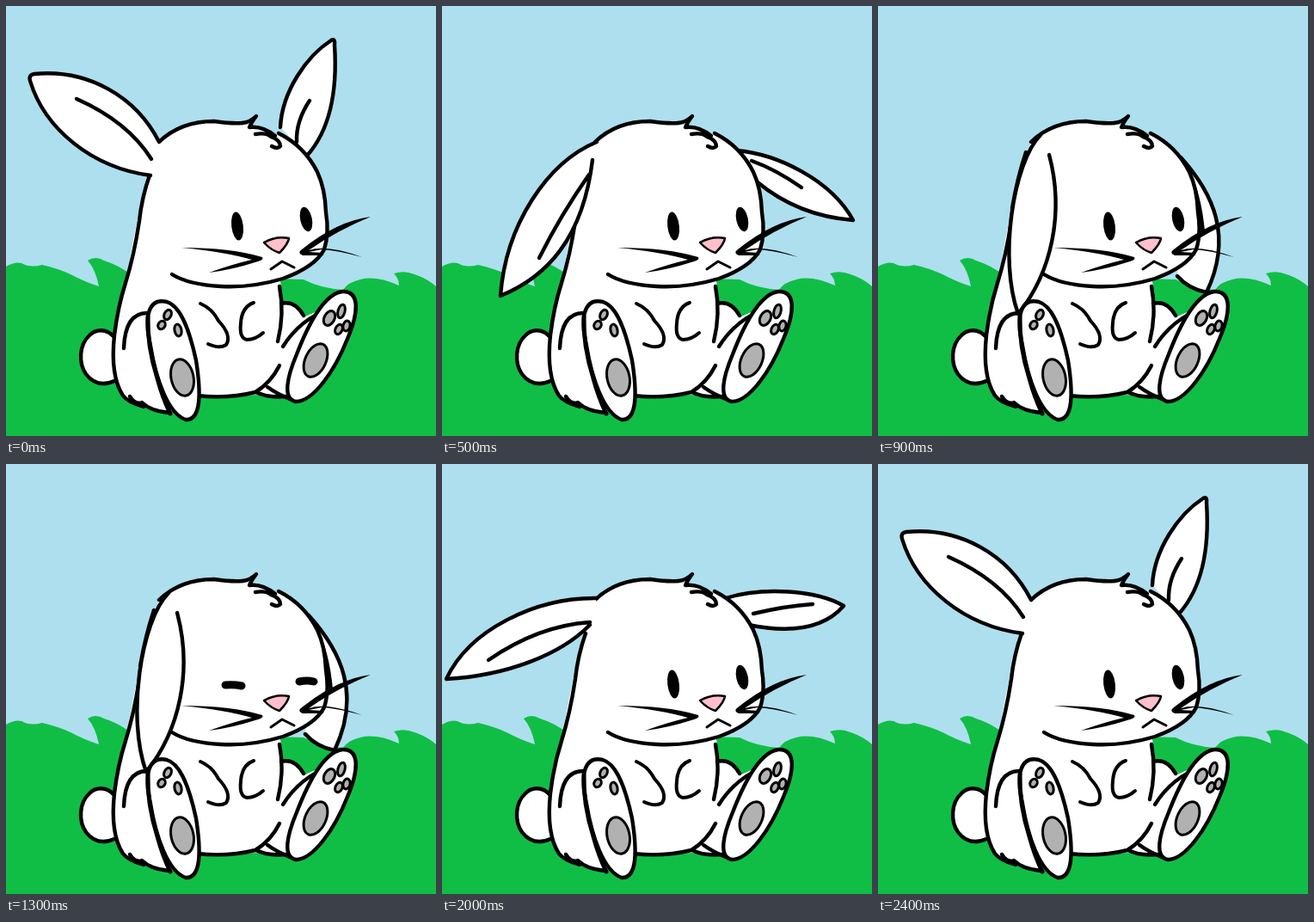
These frames come from a looping animation (500x500 px, 2.5 s). An HTML page:

```html
<!DOCTYPE html>
<html>
<head>
<meta charset="utf-8">
<title>Bunny</title>
<style>
  html, body { margin: 0; width: 100%; height: 100%; overflow: hidden; background: #aedfee; }
  svg { display: block; width: 100%; height: 100%; }
  .line, .ear { stroke: #000; stroke-width: 4.4; stroke-linecap: round; stroke-linejoin: round; }
  .line { fill: none; }
  .ear, .white { fill: #fff; }
  .pad { fill: #b1b1b1; stroke: #000; stroke-width: 3; }
</style>
</head>
<body>
<svg viewBox="0 0 500 500">
  <path fill="#10be46" d="M0 303Q10 297 18 299Q28 305 42 301Q60 305 75 312Q92 321 108 326Q104 306 95 296Q104 290 114 296Q130 301 145 312L346 318Q365 328 392 330Q398 321 412 318Q430 313 457 325Q457 317 451 311Q463 307 475 312Q490 317 500 326V500H0Z"/>

  <path class="line white" d="M126 385C116 374 104 376 97 383C85 394 84 415 93 428Q106 445 126 436"/>
  <path id="right" class="ear"/>

  <path class="white" d="M178 158Q205 133 245 134Q310 136 350 172Q374 205 373 262Q373 302 319 320L322 345Q338 341 348 361L385 345L340 452L300 452L222 453L190 472L158 466Q117 450 125 400Q128 365 139 325Q150 250 167 197Z"/>
  <path class="line" d="M178 158Q203 134 242 134Q262 137 275 136M317 148Q347 163 362 193Q371 212 372 240Q376 264 370 283Q360 303 322 317Q285 328 250 326Q212 324 193 312
    M167 197Q158 222 155 250Q149 290 139 322Q130 350 126 383Q121 430 136 453Q142 461 160 466"/>
  <path id="left" class="ear"/>

  <g class="line">
    <path d="M137 398C138 370 147 357 164 357M144 454Q150 464 158 461Q168 471 190 473"/>
    <path d="M318 326Q324 358 316 390M320 346Q336 342 346 360M222 453Q258 457 290 449Q308 438 318 418M291 449Q304 456 326 454M304 443Q315 451 330 457"/>
    <path d="M377 352Q342 364 322 396"/>
    <path class="white" d="M187 344C166 339 160 360 168 395C174 432 188 474 209 481C227 482 227 450 221 412C214 380 204 349 187 344Z"/>
    <path d="M165 361Q164 395 176 433Q182 455 191 474" stroke-width="5"/>
    <path class="white" d="M391 332C412 331 410 357 397 387C382 425 357 460 337 460C321 457 327 431 338 405C350 374 369 335 391 332Z"/>
    <path d="M226 346Q240 352 247 366Q263 383 256 394Q248 399 235 393M288 345Q274 350 273 369Q271 386 280 388Q290 388 299 380" stroke-width="4"/>
  </g>
  <g class="pad">
    <ellipse rx="13" ry="21.5" transform="translate(205 432)rotate(-12)"/>
    <ellipse rx="4" ry="6" transform="translate(188 359)rotate(25)"/>
    <ellipse rx="4" ry="5" transform="translate(181 371)rotate(30)"/>
    <ellipse rx="4" ry="7" transform="translate(200 377)rotate(-12)"/>
    <ellipse rx="12" ry="20.5" transform="translate(360 412)rotate(25)"/>
    <ellipse rx="6" ry="9" transform="translate(376 363)rotate(28)"/>
    <ellipse rx="4" ry="8" transform="translate(390 355)rotate(15)"/>
    <ellipse rx="4" ry="6" transform="translate(387 376)rotate(25)"/>
    <ellipse rx="4" ry="6" transform="translate(396 372)rotate(15)"/>
  </g>

  <path class="line" d="M275 136Q284 135 291 128Q285 136 283 141Q298 139 313 151M290 149Q303 147 308 152Q319 156 319 163Q316 167 309 163" stroke-width="4"/>
  <path d="M204 281Q262 281 298 292Q300 295 293 297Q262 307 236 310Q264 300 286 295Q255 286 204 281ZM424 245Q385 261 352 284Q373 277 414 292Q385 284 367 283L352 286L369 287V290L345 290Q338 287 344 283Q385 250 424 245Z"/>
  <path class="line" d="M308 306L321 297L335 304" style="stroke-width:3"/>
  <path class="line" d="M300 275Q314 267 329 270Q328 277 318 287Q308 284 300 275Z" style="fill:#ffc0cb;stroke-width:2.5"/>
  <g id="open">
    <ellipse rx="6.8" ry="16.5" transform="translate(269 256)rotate(-7)"/>
    <ellipse rx="6.8" ry="14.5" transform="translate(349 248)rotate(-12)"/>
  </g>
  <path id="shut" class="line" d="M255 257Q265 256 274 258M341 253Q350 251 358 253" style="stroke-width:9"/>
</svg>
<script>
const $ = id => document.getElementById(id);

// Ear outlines from raised to hanging: [left, right]
const up = [
  "M178 158C151 105 95 73 33 79Q26 80 28 87C45 143 100 188 168 197M169 178C152 151 125 127 82 108",
  "M319 141C321 99 350 58 378 40Q383 37 382 45C386 105 375 146 350 174M338 158Q337 134 353 110"];
const side = [
  "M180 156C110 155 32 192 5 250C75 246 138 222 172 187M172 184Q112 188 54 228",
  "M330 156C372 143 435 146 467 165C440 196 395 195 356 187M362 174Q400 165 431 163"];
const low = [
  "M180 158C122 182 74 255 68 337C122 315 164 270 175 179M171 196Q138 243 113 293",
  "M342 168C390 172 452 202 478 249C440 246 402 234 367 205M360 180Q388 190 418 211"];
const droop = [
  "M185 152C143 184 98 245 118 345C174 307 197 262 190 175",
  "M326 152C382 180 436 247 424 333C402 322 381 307 371 282M363 191Q391 235 398 288"];
const hang = [
  "M172 170Q162 200 156 235M189 150C157 182 140 295 163 358C202 310 217 240 199 173",
  "M352 176C390 218 413 268 382 333Q361 329 348 314M357 184Q374 217 378 264"];

// [shape, left angle, right angle]
const poses = [
  [up, 0, 0], [up, -19, 23], [side, 19, -23], [side, 0, 0],
  [low, 0, 0], [droop, 0, 0], [hang, 0, 0], [hang, -2, 2], [hang, -1, 1]];
const steps = "0012345676866666665432100";

function turn(id, path, angle, pivot) {
  $(id).setAttribute("d", path);
  $(id).setAttribute("transform", `rotate(${angle} ${pivot})`);
}

function draw(now) {
  const step = Math.floor(now % 2500 / 100);
  const [shape, a, b] = poses[steps[step]];
  turn("left", shape[0], a, "175 176");
  turn("right", shape[1], b, "342 168");
  const blink = step === 13 || step === 15;
  $("open").style.display = blink ? "none" : "";
  $("shut").style.display = blink ? "" : "none";
}

const start = performance.now();
function loop() {
  draw(performance.now() - start);
  requestAnimationFrame(loop);
}
loop();
</script>
</body>
</html>
```
